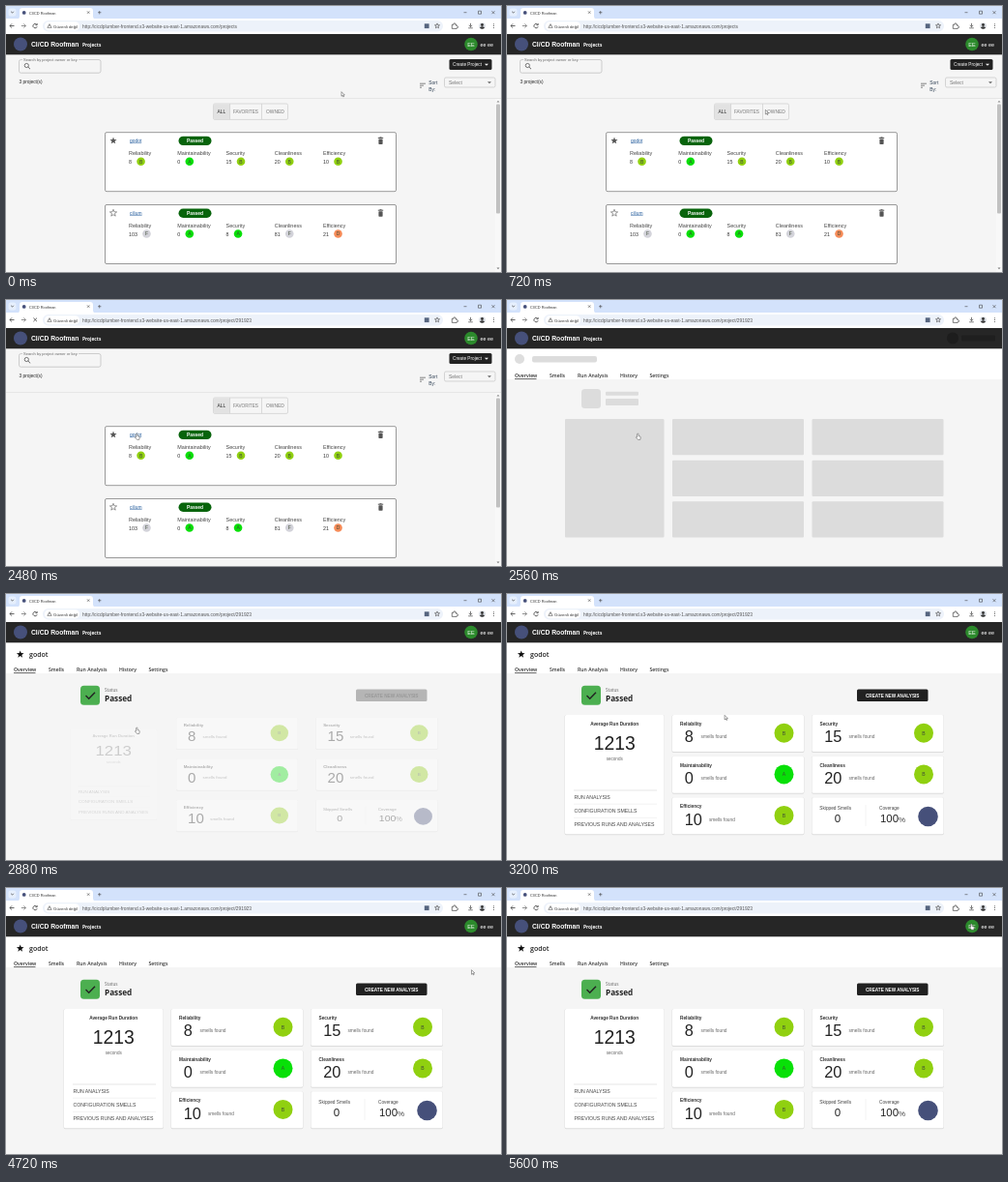
An HTML page for the animation above (5.68 s loop, 512 by 275 pixels).

```html
<!DOCTYPE html>
<html lang="en">
<head>
<meta charset="utf-8">
<title>CI/CD Roofman</title>
<style>
html, body { margin: 0; width: 100%; height: 100%; overflow: hidden; background: #f5f5f5; }
svg { display: block; width: 100vw; height: 100vh; }
text { font-family: "Liberation Sans", Arial, sans-serif; white-space: pre; }
.ui { font-family: "Open Sans", "Noto Sans", sans-serif; }
</style>
</head>
<body>
<svg id="stage" viewBox="0 0 512 275"></svg>
<script>
const LOOP = 5680, STEP = 80;
const CLICK = 2160, LOADED = 2560, READY = 2823;
const APP = 'CI/CD Roofman', USER = 'ee ee', INITIALS = 'EE';
const HOST = 'http://cicdplumber-frontend.s3-website-us-east-1.amazonaws.com';
const GRADE = { A: '#08e008', B: '#90d010', D: '#f58b58', F: '#d3d3da' };

const text = (x, y, s, size, fill = '#333', more = '') =>
  `<text x="${x}" y="${y}" font-size="${size}" fill="${fill}" ${more}>${s}</text>`;
const rect = (x, y, w, h, fill, r = 0, more = '') =>
  `<rect x="${x}" y="${y}" width="${w}" height="${h}" fill="${fill}" rx="${r}" ${more}/>`;
const disc = (x, y, r, fill, more = '') =>
  `<circle cx="${x}" cy="${y}" r="${r}" fill="${fill}" ${more}/>`;
const line = (d, color = '#444', w = .8) =>
  `<path d="${d}" fill="none" stroke="${color}" stroke-width="${w}"/>`;
const shape = (d, fill) => `<path d="${d}" fill="${fill}"/>`;
const group = (id, body, more = '') => `<g id="${id}" ${more}>${body}</g>`;
const MID = 'text-anchor="middle" ', BOLD = 'font-weight="bold" ';
const UI = 'class="ui"', SEMI = 'class="ui" font-weight="600"';

function star(x, y, r, fill, stroke = 'none') {
  const pts = Array.from({ length: 10 }, (_, i) => {
    const a = i * Math.PI / 5, q = i % 2 ? r * .42 : r;
    return `${(x + q * Math.sin(a)).toFixed(2)},${(y - q * Math.cos(a)).toFixed(2)}`;
  });
  return `<polygon points="${pts.join(' ')}" fill="${fill}" stroke="${stroke}" stroke-width=".6"/>`;
}

const grade = (x, y, r, g) =>
  disc(x, y, r, GRADE[g]) + text(x, y + 1.8, g, 5, '#3d4a35', MID);

function browser() {
  return rect(0, 0, 512, 13.5, '#d3e2fb') +
    rect(2.5, 2.5, 8, 8, '#e6effd', 2.5) + line('M5.2 5.8L6.5 7.1L7.8 5.8') +
    shape('M11 13.5Q14 13.5 14 10.5V5Q14 2 17 2H87Q90 2 90 5V10.5Q90 13.5 93 13.5Z', '#fff') +
    disc(18.7, 6.9, 1.9, '#46507a') + text(24, 8.5, APP, 3.9, '#333') +
    line('M84 5.4L86.4 7.8M86.4 5.4L84 7.8', '#444', .6) +
    line('M95 6.7H98.4M96.7 5V8.4', '#444', .6) +
    line('M473.5 6.7H476.5M488.5 5.2H491.5V8.2H488.5ZM502.5 5.2L505.5 8.2M505.5 5.2L502.5 8.2', '#444', .6) +
    rect(0, 13, 512, 16, '#fff') +
    line('M8.5 20.5H4M6 18.4L3.9 20.5L6 22.6') +
    line('M15.8 20.5H20.3M18.3 18.4L20.4 20.5L18.3 22.6', '#777') +
    group('reload', line('M31.8 19.2A2.2 2.2 0 1 0 32.2 21.2M32.2 18V19.7H30.4')) +
    group('stop', line('M28.4 18.6L32 22.2M32 18.6L28.4 22.2')) +
    rect(38, 15, 414, 11.5, '#edf2fa', 5.7) + rect(40, 16.2, 36, 9, '#fff', 4.5) +
    line('M45 18.6L47.2 22.4H42.8ZM45 19.8V21.1', '#555', .6) +
    text(49, 22.5, 'Güvenli değil', 4.35, '#333') +
    '<text id="url" x="79" y="22.7" font-size="4.85" fill="#555"></text>' +
    rect(432.8, 18.3, 4.8, 4.8, '#56657f') + star(446, 20.6, 2.7, 'none', '#444') +
    line('M461.3 19.3H463A1 1 0 1 1 464.8 19.3H466V21A1 1 0 1 1 466 22.6V23.4H461.3Z', '#444', .7) +
    line('M480.5 17.8V21.4M478.8 19.9L480.5 21.6L482.2 19.9M478.2 22.8H482.8', '#444', .7) +
    disc(492.5, 20.5, 3.3, '#d8dce2') + disc(492.5, 19.5, 1.4, '#333') +
    shape('M489.9 22.6Q492.5 19.8 495.1 22.6Q492.5 25 489.9 22.6Z', '#333') +
    [18.8, 20.6, 22.4].map(y => disc(504.5, y, .5, '#444')).join('');
}

function appBar() {
  return rect(0, 29, 512, 21.3, '#262626') + disc(15, 39.5, 7, '#46507a') +
    text(26, 42.2, APP, 6.75, '#fff', BOLD) +
    text(79, 41.9, 'Projects', 4.8, '#fff', 'class="ui" font-weight="700"') +
    group('user', disc(481, 39.5, 6.8, '#2c8a2c') + text(481, 41.5, INITIALS, 5.6, '#fff', MID) +
      text(490.5, 41.5, USER, 5.4, '#fff')) +
    group('noUser', disc(461, 39.5, 6, '#1d1d1d') + rect(470, 36.5, 35, 6, '#1f1f1f', 1));
}

function project(y, name, starred, items) {
  const names = ['Reliability', 'Maintainability', 'Security', 'Cleanliness', 'Efficiency'];
  const width = name === 'godot' ? 12.2 : 12.6;
  return rect(102.5, y, 301, 61, '#fff', 1.5, 'stroke="#808080" stroke-width=".8"') +
    star(111, y + 8.6, 3.8, starred ? '#555' : 'none', starred ? 'none' : '#555') +
    text(128, y + 10, name, 4.9, '#245c9c') + line(`M128 ${y + 11}h${width}`, '#245c9c', .5) +
    rect(178.5, y + 4, 34, 9.4, '#08640c', 4.7) + text(195.5, y + 10.4, 'Passed', 4.9, '#fff', MID + BOLD) +
    rect(385.4, y + 6.8, 4.2, 5.4, '#555', .6) + rect(384.8, y + 5.2, 5.4, 1, '#555') +
    rect(386.5, y + 4.7, 2, .8, '#555') +
    items.map(([value, letter], i) => {
      const x = 127 + i * 50.25, digits = String(value).length;
      return text(x, y + 23, names[i], 5.45, '#444') +
        text(x, y + 32.3, value, 5.3, '#333') +
        grade(x + 9.6 + digits * 2.95, y + 30, 4.3, letter);
    }).join('');
}

function listPage() {
  return rect(0, 50, 512, 225, '#f5f5f5') + line('M0 95.5H512', '#e2e2e2', .8) +
    rect(13.5, 55.5, 84.5, 13.7, 'none', 2, 'stroke="#bbb" stroke-width=".7"') +
    rect(17, 54.5, 58, 2, '#f5f5f5') + text(18, 57, 'Search by project owner or key', 4.05, '#666') +
    disc(21.3, 61.5, 2.1, 'none', 'stroke="#555" stroke-width=".8"') + line('M22.8 63L25 65.2', '#555', .9) +
    text(13.5, 79.6, '3 project(s)', 4.8, '#222') +
    rect(458.5, 55, 44, 11, '#222', 1.5) + text(462, 62.2, 'Create Project', 4.7, '#fff') +
    shape('M495 59.7H499L497 61.8Z', '#fff') +
    line('M428 80.2H434M428 82.2H432M428 84.2H430', '#555', .7) +
    text(437.3, 81.2, 'Sort', 4.9, '#2f4054') + text(437.3, 88, 'By:', 4.9, '#2f4054') +
    rect(453.5, 74, 52.5, 10, 'none', 1.5, 'stroke="#c4c4c4" stroke-width=".7"') +
    text(458, 80.8, 'Select', 5, '#777') + shape('M498 78.2H502L500 80.3Z', '#666') +
    rect(214.5, 101, 77, 16.4, 'none', 1.5, 'stroke="#d2d2d2" stroke-width=".8"') +
    rect(214.9, 101.4, 16.6, 15.6, '#e2e2e2', 1) +
    line('M231.5 101V117.4M264.5 101V117.4', '#d2d2d2', .8) +
    text(218.6, 111, 'ALL', 4.8, '#222') + text(235, 111, 'FAVORITES', 4.7, '#777') +
    text(269, 111, 'OWNED', 4.9, '#777') +
    project(130.7, 'godot', true, [[8, 'B'], [0, 'A'], [15, 'B'], [20, 'B'], [10, 'B']]) +
    project(205.5, 'cilium', false, [[103, 'F'], [0, 'A'], [8, 'A'], [81, 'F'], [21, 'D']]) +
    rect(506, 96, 6, 179, '#f8f8f8') + rect(507, 101.5, 4, 113, '#c1c1c1', 1) +
    shape('M507.5 99.5H510.5L509 97.7Z', '#888') + shape('M507.5 270.5H510.5L509 272.3Z', '#777');
}

function skeleton() {
  const bone = (x, y, w, h, r = 1) => rect(x, y, w, h, '#dcdcdc', r);
  const rows = [123, 165.7, 208.3];
  return disc(13, 61, 5, '#dedede') + bone(26, 58, 67, 6.5, 2) +
    bone(77, 92, 20, 20, 3.5) + bone(102, 94.7, 34, 4) + bone(102, 102, 34, 7) +
    bone(60, 123, 102.5, 122.5) +
    rows.map(y => bone(171, y, 136, 37.2) + bone(315.5, y, 136, 37.2)).join('');
}

const sheet = (x, y, w, h) =>
  rect(x - .4, y, w + .8, h + 1, '#000', 1.6, 'opacity=".1"') + rect(x, y, w, h, '#fff', 1.5);

const cards = [];
function card(x, y, w, h, body) {
  const id = 'card' + cards.length;
  cards.push({ id, cx: x + w / 2, cy: y + h / 2, h });
  return group(id, sheet(x, y, w, h) + body);
}

function metric(x, y, name, value, letter) {
  const w = String(value).length * 8.35;
  return card(x, y, 136, 38, text(x + 8, y + 11, name, 4.75, '#333', BOLD) +
    text(x + 12.8, y + 28.3, value, 16.3, '#222') +
    text(x + 21.2 + w, y + 24.3, 'smells found', 4.8, '#666') +
    grade(x + 115.5, y + 18.7, 10, letter));
}

function detailPage() {
  const tabs = [[8, 'Overview'], [44, 'Smells'], [73, 'Run Analysis'], [117, 'History'], [147.5, 'Settings']];
  const links = ['RUN ANALYSIS', 'CONFIGURATION SMELLS', 'PREVIOUS RUNS AND ANALYSES'];
  return rect(0, 50, 512, 225, '#f5f5f5') + rect(0, 50, 512, 32, '#fff') +
    tabs.map(([x, s]) => text(x, 80, s, 5.15, '#333', SEMI)).join('') +
    rect(8, 81.2, 22.5, .9, '#555') +
    group('bones', skeleton()) +
    group('content',
      star(14.7, 62.4, 4, '#111') + text(24, 65.1, 'godot', 7, '#222', SEMI) +
      rect(77, 94.8, 20, 20, '#4caf50', 3.5) + line('M82.5 105L85.7 108.2L92 101.7', '#222', 1.4) +
      text(102, 101.2, 'Status', 4.7, '#666', UI) +
      text(102, 110.7, 'Passed', 8.2, '#222', 'class="ui" font-weight="700"') +
      rect(362, 98.6, 73.5, 12.4, '#212121', 1.5, 'id="button"') +
      text(398.7, 106.5, 'CREATE NEW ANALYSIS', 4.7, '#fff', MID + BOLD + 'id="buttonText"') +
      card(60, 125, 102.5, 123.2,
        text(111.2, 135.7, 'Average Run Duration', 4.75, '#333', MID + BOLD) +
        text(111.2, 161, '1213', 19.4, '#222', MID) + text(111.2, 171.6, 'seconds', 4.6, '#666', MID) +
        links.map((s, i) => line(`M69 ${203 + i * 14.2}H155`, i ? '#eee' : '#dcdcdc', .7) +
          text(69.5, 211.7 + i * 14.2, s, 5.18, '#444')).join('')) +
      metric(171, 125, 'Reliability', 8, 'B') + metric(315.5, 125, 'Security', 15, 'B') +
      metric(171, 167.7, 'Maintainability', 0, 'A') + metric(315.5, 167.7, 'Cleanliness', 20, 'B') +
      metric(171, 210.2, 'Efficiency', 10, 'B') +
      card(315.5, 210.2, 136, 38,
        text(323.3, 223.3, 'Skipped Smells', 4.75, '#444') + text(342, 236.4, '0', 11.5, '#222', MID) +
        text(385, 223.3, 'Coverage', 4.75, '#444') + text(386, 236.4, '100', 11.4, '#222') +
        text(405, 236.4, '%', 8, '#444') + line('M371 218V240', '#eee', .7) +
        disc(435.5, 230, 10.3, '#46507a')));
}

const EDGE = 'fill="#fff" stroke="#444" stroke-width=".5" stroke-linejoin="round"';
const cursor = group('cursor',
  `<path id="arrow" d="M0 0V4.6L1.1 3.6L1.8 5.2L2.6 4.9L1.9 3.3H3.3Z" ${EDGE}/>` +
  `<path id="hand" d="M-.7 3.6V.6a.7.7 0 0 1 1.4 0V2.4l1.5.4q.8.2.7 1L2.5 6.2H.2L-1.9 3.7q.4-.9 1.2-.1Z" ${EDGE}/>`);

document.getElementById('stage').innerHTML =
  group('list', listPage()) + group('detail', detailPage()) + appBar() + browser() + cursor;

const $ = id => document.getElementById(id);
const show = (id, on) => $(id).setAttribute('visibility', on ? 'visible' : 'hidden');
const display = (id, on) => $(id).setAttribute('display', on ? 'inline' : 'none');
const clamp = v => Math.min(1, Math.max(0, v));

// cubic-bezier(.4, 0, .2, 1)
function ease(p) {
  p = clamp(p);
  let lo = 0, hi = 1;
  for (let i = 0; i < 24; i++) {
    const u = (lo + hi) / 2, v = 1 - u;
    if (1.2 * u * v * v + .6 * u * u * v + u * u * u < p) lo = u; else hi = u;
  }
  return lo * lo * (3 - 2 * lo);
}

const TRACK = [[0, 347, 88.7], [320, 347, 88.7], [1280, 135.3, 138.2], [2960, 135.3, 138.2],
  [3680, 481.6, 88.5], [4640, 481.6, 88.5], [5120, 480.3, 37], [LOOP, 480.3, 37]];

function pointer(t) {
  const i = TRACK.findIndex(k => k[0] > t);
  const [t0, x0, y0] = TRACK[i - 1], [t1, x1, y1] = TRACK[i];
  const p = (t - t0) / (t1 - t0), e = p * p * (3 - 2 * p);
  return [x0 + (x1 - x0) * e, y0 + (y1 - y0) * e];
}

// Taller cards take longer to grow in.
function grow({ id, cx, cy, h }, dt) {
  const k = h / 36, span = (4 + 15 * k ** .25 + k / 5) * 10;
  const s = .75 + .25 * ease(dt / span / .666);
  $(id).setAttribute('transform', `translate(${cx} ${cy}) scale(${s} ${s * s}) translate(${-cx} ${-cy})`);
  $(id).setAttribute('opacity', ease(dt / span));
}

function render(t) {
  const loading = t >= CLICK && t < LOADED, opened = t >= LOADED, ready = t >= READY;
  display('list', !opened);
  display('detail', opened);
  display('bones', !ready);
  display('content', ready);
  display('user', !opened || ready);
  display('noUser', opened && !ready);
  display('reload', !loading);
  display('stop', loading);
  $('url').textContent = HOST + (t < CLICK ? '/projects' : '/project/291923');

  const dt = t - READY, b = ease(dt / 250), g = Math.round(215 - 182 * b);
  cards.forEach(c => grow(c, dt));
  $('button').setAttribute('fill', `rgb(${g},${g},${g})`);
  $('buttonText').setAttribute('fill', b < .5 ? '#999' : '#fff');

  const [x, y] = pointer(t), hand = (t >= 1240 && t <= 2960) || t >= 5040;
  $('cursor').setAttribute('transform', `translate(${x} ${y})`);
  show('hand', hand);
  show('arrow', !hand);
}

let start = null;
function tick(now) {
  if (start === null) start = now;
  render(Math.floor((now - start) % LOOP / STEP) * STEP);
  requestAnimationFrame(tick);
}
render(0);
requestAnimationFrame(tick);
</script>
</body>
</html>
```
